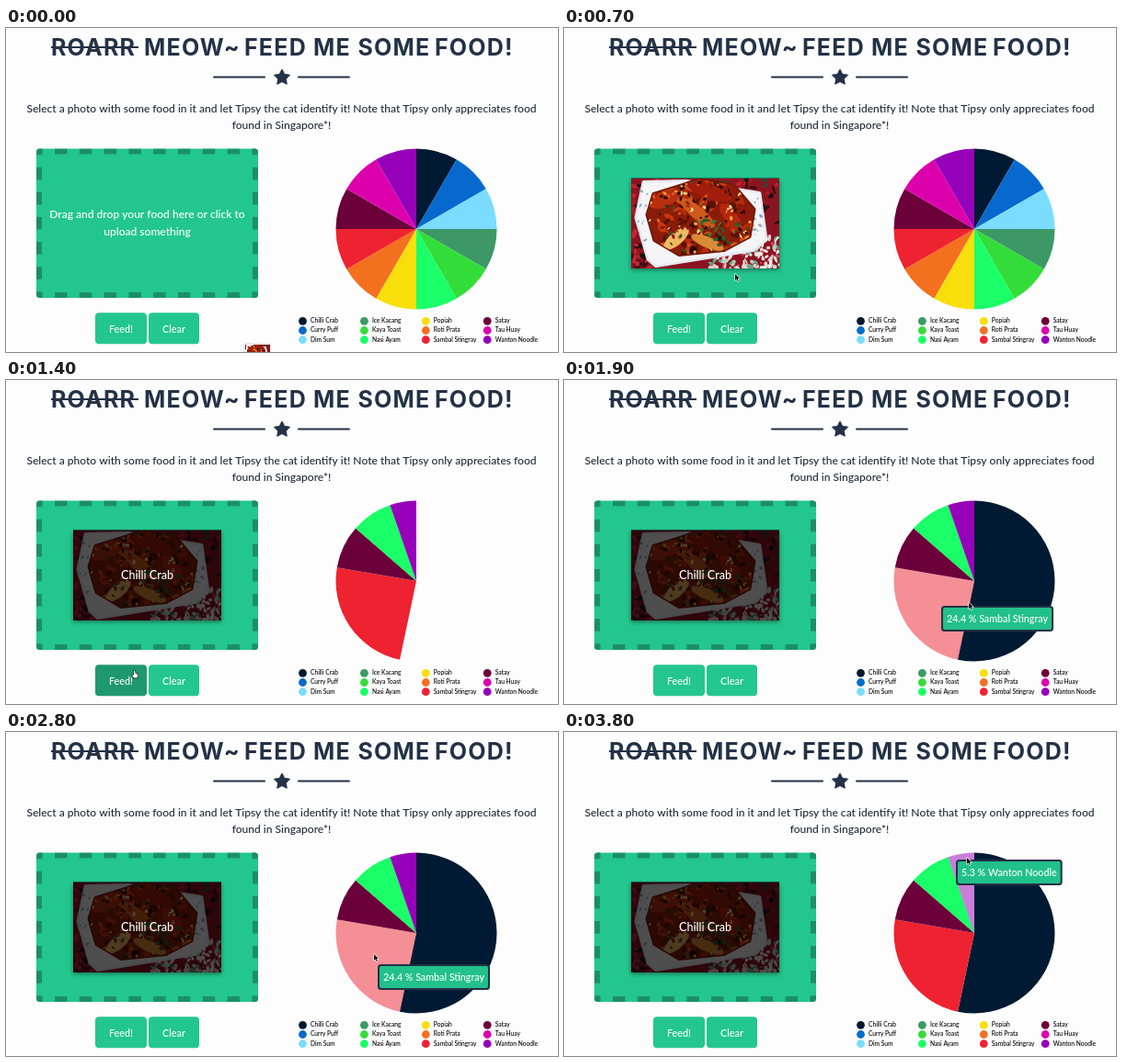
An HTML page with a canvas for the animation above (3900 ms loop, 600 px wide and 353 px high).

```html
<!DOCTYPE html>
<html lang="en">
<head>
<meta charset="utf-8">
<title>Feed the cat</title>
<style>
html, body { margin: 0; width: 100%; height: 100%; overflow: hidden; background: #fdfdfd; }
canvas { display: block; width: 600px; height: 353px; }
</style>
</head>
<body>
<canvas id="stage"></canvas>
<script>
const LOOP = 3900, STEP = 100;
const DROP = 400, RESULT = 1300, FULL_PIE = 1500;
const INK = '#233246', GREEN = '#23c68f', DARK_GREEN = '#1b8f68';
const PIE = { x: 446, y: 219, r: 87.5 };
const ZONE = { x: 33, y: 131.5, w: 241, h: 162.5 };
const PHOTO = { x: 73, y: 163.5, w: 161, h: 98.5 };

const foods = [
  ['Chilli Crab', '#001a33', 53.3], ['Curry Puff', '#0769ce', 0], ['Dim Sum', '#7bdcff', 0],
  ['Ice Kacang', '#3c9966', 0], ['Kaya Toast', '#33dd39', 0], ['Nasi Ayam', '#1bff68', 8.3],
  ['Popiah', '#f8df0c', 0], ['Roti Prata', '#f3701f', 0], ['Sambal Stingray', '#ee2230', 24.4],
  ['Satay', '#6c003a', 8.7], ['Tau Huay', '#dc00ac', 0], ['Wanton Noodle', '#9600b8', 5.3]
].map(([name, color, share]) => ({ name, color, share }));
const resultOrder = [0, 8, 9, 5, 11].map(i => foods[i]);

// Pointer path: time, x, y
const path = [
  [0, 273, 354], [200, 245, 315], [400, 194, 264], [500, 193, 260], [700, 186, 268],
  [1000, 140, 318], [1400, 140, 318], [1600, 250, 285], [1800, 410, 245], [2000, 470, 240],
  [2100, 472, 246], [2300, 440, 254], [2400, 416, 255], [2700, 404, 252], [2900, 396, 232],
  [3100, 386, 196], [3200, 388, 196], [3400, 389, 178], [3500, 394, 162],
  [3600, 408, 148], [3700, 426, 138], [3800, 438, 137]
];

const canvas = document.getElementById('stage');
const ratio = window.devicePixelRatio || 1;
canvas.width = 600 * ratio;
canvas.height = 353 * ratio;
const ctx = canvas.getContext('2d');
ctx.scale(ratio, ratio);

function pointerAt(t) {
  for (let i = 1; i < path.length; i++) {
    const [t0, x0, y0] = path[i - 1], [t1, x1, y1] = path[i];
    if (t <= t1) {
      const k = Math.max(0, (t - t0) / (t1 - t0));
      return { x: x0 + (x1 - x0) * k, y: y0 + (y1 - y0) * k };
    }
  }
  const [, x, y] = path[path.length - 1];
  return { x, y };
}

function text(str, x, y, size, color = '#fff', align = 'center') {
  ctx.font = `500 ${size}px Lato, sans-serif`;
  ctx.textAlign = align;
  ctx.fillStyle = color;
  ctx.fillText(str, x, y);
}

function box(x, y, w, h, r, fill) {
  ctx.beginPath();
  ctx.roundRect(x, y, w, h, r);
  ctx.fillStyle = fill;
  ctx.fill();
}

function polygon(c, points, fill, stroke, width = 1) {
  c.beginPath();
  points.forEach(([x, y]) => c.lineTo(x, y));
  c.closePath();
  if (stroke) {
    c.strokeStyle = stroke;
    c.lineWidth = width;
    c.lineJoin = 'round';
    c.stroke();
  }
  c.fillStyle = fill;
  c.fill();
}

function randomizer(seed) {
  return () => (seed = (seed * 16807) % 2147483647) / 2147483647;
}

function makePhoto() {
  const photo = document.createElement('canvas');
  photo.width = PHOTO.w * 2;
  photo.height = PHOTO.h * 2;
  const c = photo.getContext('2d');
  const rnd = randomizer(4217);
  const pick = list => list[Math.floor(rnd() * list.length)];
  const blob = (x, y, rx, ry, turn, fill) => {
    c.beginPath();
    c.ellipse(x, y, rx, ry, turn, 0, 7);
    c.fillStyle = fill;
    c.fill();
  };
  const scatter = (n, x, y, w, h, size, colors) => {
    for (let i = 0; i < n; i++) {
      blob(x + rnd() * w, y + rnd() * h, size * (0.4 + rnd()), size * (0.3 + rnd() * 0.5), rnd() * 3, pick(colors));
    }
  };
  c.scale(2, 2);
  c.fillStyle = '#8c1420';
  c.fillRect(0, 0, PHOTO.w, PHOTO.h);
  scatter(90, 0, 0, 161, 55, 4, ['#3a0c14', '#c3202c', '#244a38', '#1c1014', '#a91a28']);
  scatter(150, 85, 62, 76, 37, 3, ['#ecd0d0', '#d04858', '#6ca588', '#f6ecea', '#b8d0be', '#f2e2e2']);
  scatter(30, 0, 58, 20, 40, 4, ['#4a1018', '#c12932', '#1f1014']);

  // Dish, its rim pattern, then the food
  polygon(c, [[14, 5], [60, 4], [139, 17], [146, 67], [132, 78], [27, 95], [19, 88], [6, 43]],
    '#f5f5f8', '#e6e8f0', 5);
  scatter(14, 7, 14, 12, 60, 1.8, ['#8ba8d8', '#7fb298', '#f4f3f5']);
  scatter(14, 132, 20, 11, 45, 1.8, ['#7f9fd0', '#8eb6a0', '#dfa766']);

  polygon(c, [[24, 17], [56, 7], [74, 1], [112, 8], [134, 34], [129, 64], [101, 79], [52, 84], [25, 68], [17, 40]],
    '#8a1d08', '#6b1808', 3);
  c.save();
  c.clip();
  scatter(150, 12, 0, 125, 88, 6, ['#5a1206', '#b52c0c', '#d9541a', '#8f1a0a', '#260805', '#c9360f']);
  blob(38, 22, 17, 9, -0.5, '#b8300f');
  blob(84, 14, 26, 8, 0.35, '#a31d0d');
  blob(72, 38, 24, 7, 0.7, '#cf5a1c');
  blob(108, 42, 17, 7, 0.9, '#b5270e');
  blob(49, 66, 17, 7, -0.7, '#eeb962');
  blob(83, 70, 19, 6, 0.4, '#d98a36');
  scatter(150, 15, 0, 118, 86, 2.2,
    ['#3a0d05', '#f0a247', '#2f5728', '#1c0704', '#df5721', '#f6d58a', '#8a1a08']);
  scatter(16, 75, 46, 40, 22, 3, ['#23602f', '#2f7a3c']);
  c.restore();
  return photo;
}
const photo = makePhoto();

function drawHeader() {
  ctx.font = '700 25px Inter, sans-serif';
  ctx.letterSpacing = '1.2px';
  ctx.textAlign = 'left';
  ctx.fillStyle = INK;
  [['ROARR', 49], ['MEOW~', 150], ['FEED', 259], ['ME', 334], ['SOME', 382.5], ['FOOD!', 466]]
    .forEach(([word, x]) => ctx.fillText(word, x, 29.5));
  ctx.letterSpacing = '0px';
  ctx.fillRect(49, 20, 95, 2);
  box(225, 52.5, 57, 2, 1, INK);
  box(317, 52.5, 57, 2, 1, INK);
  const star = Array.from({ length: 10 }, (_, i) => {
    const a = i * Math.PI / 5, r = i % 2 ? 4.6 : 9;
    return [300 + r * Math.sin(a), 54 - r * Math.cos(a)];
  });
  polygon(ctx, star, INK, INK, 1);
  text('Select a photo with some food in it and let Tipsy the cat identify it! Note that Tipsy only appreciates food',
    299.5, 91.5, 12.05, '#202b38');
  text('found in Singapore*!', 299.5, 110, 12.05, '#202b38');
}

// Every side is split evenly, with half a dash at each corner.
function drawDashes({ x, y, w, h }, across, down) {
  const stepX = w / across, stepY = h / down;
  for (let i = 0; i <= across; i++) {
    const left = x + (i - 0.25) * stepX;
    ctx.fillRect(left, y, stepX / 2, 6);
    ctx.fillRect(left, y + h - 6, stepX / 2, 6);
  }
  for (let i = 0; i <= down; i++) {
    const top = y + (i - 0.25) * stepY;
    ctx.fillRect(x, top, 6, stepY / 2);
    ctx.fillRect(x + w - 6, top, 6, stepY / 2);
  }
}

function drawDropZone(t) {
  ctx.save();
  box(ZONE.x, ZONE.y, ZONE.w, ZONE.h, 4, GREEN);
  ctx.clip();
  ctx.fillStyle = DARK_GREEN;
  drawDashes(ZONE, 9, 6);
  ctx.restore();

  if (t < DROP) {
    text('Drag and drop your food here or click to', 153.5, 207, 12.05);
    text('upload something', 153.5, 226, 12.05);
    return;
  }
  const { x, y, w, h } = PHOTO;
  ctx.save();
  ctx.shadowColor = 'rgba(0,0,0,.45)';
  ctx.shadowBlur = 5 * ratio;
  ctx.shadowOffsetY = 2 * ratio;
  ctx.fillRect(x, y, w, h);
  ctx.restore();
  ctx.drawImage(photo, x, y, w, h);
  if (t >= RESULT) {
    ctx.fillStyle = 'rgba(0,0,0,.68)';
    ctx.fillRect(x, y, w, h);
    text('Chilli Crab', 153.5, 217, 12.6);
  }
}

const overFeed = p => p.x > 97 && p.x < 153 && p.y > 310 && p.y < 344;

function drawButtons(pointer) {
  box(97, 310.3, 56, 34, 4, overFeed(pointer) ? '#20986f' : GREEN);
  box(155, 310.3, 55, 34, 4, GREEN);
  text('Feed!', 125, 331.5, 10.8);
  text('Clear', 182.5, 331.5, 10.8);
}

function pieSlices(t) {
  const list = t < RESULT ? foods : resultOrder;
  let end = 0;
  return list.map(food => {
    const start = end;
    end += (t < RESULT ? 1 / 12 : food.share / 100) * Math.PI * 2;
    return { food, start, end };
  });
}

function drawPie(t, pointer) {
  const dx = pointer.x - PIE.x, dy = pointer.y - PIE.y;
  const angle = (Math.atan2(dx, -dy) + Math.PI * 2) % (Math.PI * 2);
  const inside = Math.hypot(dx, dy) < PIE.r;
  let hovered = null;
  for (const { food, start, end } of pieSlices(t)) {
    if (t >= RESULT && t < FULL_PIE && food === foods[0]) continue;
    const hover = inside && angle >= start && angle < end;
    if (hover) hovered = food;
    ctx.globalAlpha = hover ? 0.5 : 1;
    ctx.beginPath();
    ctx.moveTo(PIE.x, PIE.y);
    ctx.arc(PIE.x, PIE.y, PIE.r, start - Math.PI / 2, end - Math.PI / 2);
    ctx.fillStyle = food.color;
    ctx.fill();
  }
  ctx.globalAlpha = 1;
  return hovered;
}

function drawLegend() {
  foods.forEach(({ name, color }, i) => {
    const x = 322.5 + Math.floor(i / 3) * 66.9, y = 319.3 + (i % 3) * 10.2;
    ctx.beginPath();
    ctx.arc(x, y, 4.4, 0, 7);
    ctx.fillStyle = color;
    ctx.fill();
    text(name, x + 8.5, y + 1.8, 6.65, '#000', 'left');
  });
}

function drawTooltip(food, { x, y }) {
  const label = `${food.share.toFixed(1)} % ${food.name}`;
  ctx.font = '500 10.7px Lato, sans-serif';
  const w = ctx.measureText(label).width + 12;
  box(x, y + 1, w, 28, 3.5, INK);
  box(x + 2, y + 3, w - 4, 24, 2, '#22c08b');
  text(label, x + w / 2, y + 19, 10.7);
}

function drawArrow({ x, y }) {
  const shape = [[0, 0], [0, 7], [1.6, 5.6], [2.7, 8.1], [3.8, 7.6], [2.7, 5.1], [5, 5]];
  polygon(ctx, shape.map(([a, b]) => [x + a, y + b]), '#111', '#fff', 1.2);
}

function drawHand({ x, y }) {
  const shape = [[-1, 0], [0.2, 0], [0.5, 2.6], [3.2, 3.4], [3.4, 5.2], [2.4, 7.6], [-1, 7.6], [-3, 4.8], [-2.2, 4], [-1, 4.8]];
  polygon(ctx, shape.map(([a, b]) => [x + a, y + b - 1]), '#fff', '#111', 1.2);
}

function drawDragged({ x, y }) {
  box(x - 15, y - 11, 30, 21, 0, '#eceaea');
  ctx.drawImage(photo, x - 13.5, y - 9.5, 27, 18);
}

function draw(t) {
  const pointer = pointerAt(t);
  ctx.fillStyle = '#fdfdfd';
  ctx.fillRect(0, 0, 600, 353);
  drawHeader();
  drawDropZone(t);
  drawButtons(pointer);
  const hovered = drawPie(t, pointer);
  drawLegend();
  if (t < DROP) drawDragged(pointer);
  // The tooltip trails the pointer by one step.
  if (hovered) drawTooltip(hovered, pointerAt(t - STEP));
  if (overFeed(pointer)) drawHand(pointer);
  else drawArrow(pointer);
}

const began = performance.now();
function tick() {
  const t = (performance.now() - began) % LOOP;
  draw(Math.floor(t / STEP) * STEP);
  requestAnimationFrame(tick);
}
tick();
</script>
</body>
</html>
```
